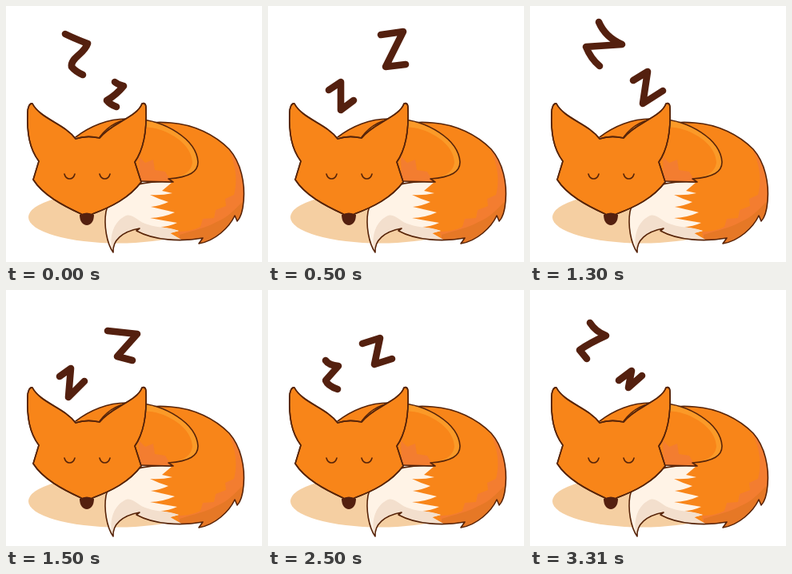
These frames come from a looping animation (320x320 px, 3.51 s). An HTML page:

```html
<!DOCTYPE html>
<html lang="en">
<head>
<meta charset="utf-8">
<title>Sleeping fox</title>
<style>
html, body { margin: 0; width: 100%; height: 100%; overflow: hidden; background: #fff; }
svg { display: block; width: 100%; height: 100%; }
.line { stroke: #572409; stroke-width: 1.6; stroke-linejoin: round; stroke-linecap: round; }
.open { fill: none; }
.fur { fill: #f88519; }
.light { fill: #fb9a28; }
.shade { fill: #f37d30; }
.deep { fill: #e67826; }
.dark { fill: #54200f; }
.cream { fill: #fff3e6; }
.z { fill: none; stroke: #54200f; stroke-width: 8.6; stroke-linecap: round; stroke-linejoin: round; }
</style>
</head>
<body>
<svg viewBox="0 0 320 320">
  <defs>
    <path id="body" d="M87 164C105 150 128 141 150 141L176 147C184 145 195 145 206 146C235 148 261 161 279 179C294 196 299 222 297 244C296 256 294 264 289 269L286 262C279 277 261 294 241 297L246 290C218 295 185 293 163 281L167 278C145 282 133 293 134 308C126 297 122 274 125 257C131 233 158 217 207 220"/>
    <clipPath id="inside"><use href="#body"/></clipPath>
  </defs>

  <ellipse cx="140" cy="264" rx="112" ry="32.5" fill="#f5cfa2"/>

  <!-- back and tail -->
  <use href="#body" class="fur"/>
  <g clip-path="url(#inside)">
    <path class="shade" d="M274 172C285 190 291 213 285 236L274 241L275 250L262 255L260 265L246 266L243 276C233 281 224 282 215 282L218 300H310V172Z"/>
    <path class="deep" d="M300 240C288 252 279 264 263 270C249 278 235 280 217 286V300H300Z"/>
    <path class="cream" d="M134 308C126 297 122 274 125 257C131 233 158 217 208 220L195 231L208 234Q194 237 180 236Q190 241 203 245Q192 250 181 251Q194 254 211 258Q195 265 180 265Q196 268 214 271Q203 276 193 276Q205 278 216 281L205 284L219 292C190 295 172 283 163 281C139 286 133 296 134 308Z"/>
    <path fill="#f3dfcd" d="M134 308C128 292 133 271 148 263C158 257 164 270 177 273C190 278 201 275 216 281L205 284L219 292C190 295 172 283 163 281C139 286 133 296 134 308Z"/>
  </g>
  <use href="#body" class="line open"/>

  <path class="light" d="M117 164C128 149 144 141 162 141C198 143 238 166 240 195C240 207 230 214 203 216L209 220L167 219Z"/>
  <path class="fur" d="M117 168C138 153 165 149 187 153C214 160 233 178 233 196C231 209 219 214 203 216L209 220L167 219Z"/>
  <path class="shade" d="M166 188L174 196L184 192L186 205L199 207L205 217L209 220L167 219Z"/>
  <path class="line open" d="M117 164C128 149 144 141 162 141C198 143 238 166 240 195C240 207 230 214 203 216L209 220L167 219"/>

  <!-- head -->
  <path id="head" class="fur" d="M33 122C29 121 27 128 27 133C26 158 29 178 41 194L34 217C46 236 70 249 94 260Q101 267 108 260C132 251 154 240 169 220L161 195C173 178 176 154 175 128C175 122 173 121 170 122C164 139 132 146 117 165C108 163 96 163 87 166C73 147 43 141 33 122Z"/>
  <path class="light" d="M32 124C41 142 72 148 86 166L75 174C62 161 44 150 33 135ZM171 124C163 141 133 147 118 165L129 174C141 160 159 150 170 135Z"/>
  <path class="light" d="M89 166Q103 163 116 166C115 182 110 194 103 203C95 195 90 182 89 166Z"/>
  <path class="dark" d="M34 141C46 150 57 165 61 180Q52 185 47 195C35 180 32 160 34 141ZM168 141C156 150 146 165 141 180Q151 185 157 195C167 180 170 160 168 141Z"/>
  <path class="cream" d="M35 218C49 231 74 234 86 243Q94 250 96 261C72 251 47 238 35 218ZM168 221C154 232 129 234 118 243Q110 250 107 261C132 251 153 241 168 221Z"/>
  <use href="#head" class="line open" style="fill: none"/>
  <path class="line open" d="M33 122C29 121 27 128 27 133C26 158 29 178 41 194L34 217C46 236 70 249 94 260Q101 267 108 260C132 251 154 240 169 220L161 195C173 178 176 154 175 128C175 122 173 121 170 122C164 139 132 146 117 165C108 163 96 163 87 166C73 147 43 141 33 122Z"/>
  <path class="dark" d="M92 261Q101 256 110 261C110 269 106 274 101 274S92 269 92 261Z"/>
  <path class="line open" d="M73 210C75 218 84 218 86 210M117 210C119 218 128 218 130 210"/>

  <path id="big" class="z"/>
  <path id="small" class="z"/>
</svg>
<script>
const STEP = 500, LOOP = 3510;
const big = document.getElementById("big");
const small = document.getElementById("small");

// Each pose holds the large and the small letter
const poses = [
  ["M74 35Q84 40 102 47C98 60 80 65 82 76Q87 82 96 86", "M136 95Q141 99 147 100Q138 111 126 118Q130 123 138 126"],
  ["M141 36L169 32L147 76L172 73", "M76 105L91 95L91 130L107 118"],
  ["M86 20Q94 39 115 48L70 51Q76 66 87 75", "M129 93L147 82L141 122L166 106"],
  ["M127 51L164 55L139 83L158 88", "M67 108L81 98L78 134L98 114"],
  ["M88 34Q93 42 106 48L71 70L84 83", "M119 85L153 78L127 115L164 102"],
  ["M118 67L140 60L133 93L155 86", "M72 88Q76 94 88 95L72 113Q75 120 87 124"],
  ["M75 41Q82 52 95 57Q75 66 62 75L71 86", "M111 113L127 101L123 122L140 107"]
];

function draw(time) {
  const i = Math.min(Math.floor((time % LOOP) / STEP), poses.length - 1);
  big.setAttribute("d", poses[i][0]);
  small.setAttribute("d", poses[i][1]);
}

const start = performance.now();
function tick() {
  draw(performance.now() - start);
  requestAnimationFrame(tick);
}
tick();
</script>
</body>
</html>
```
